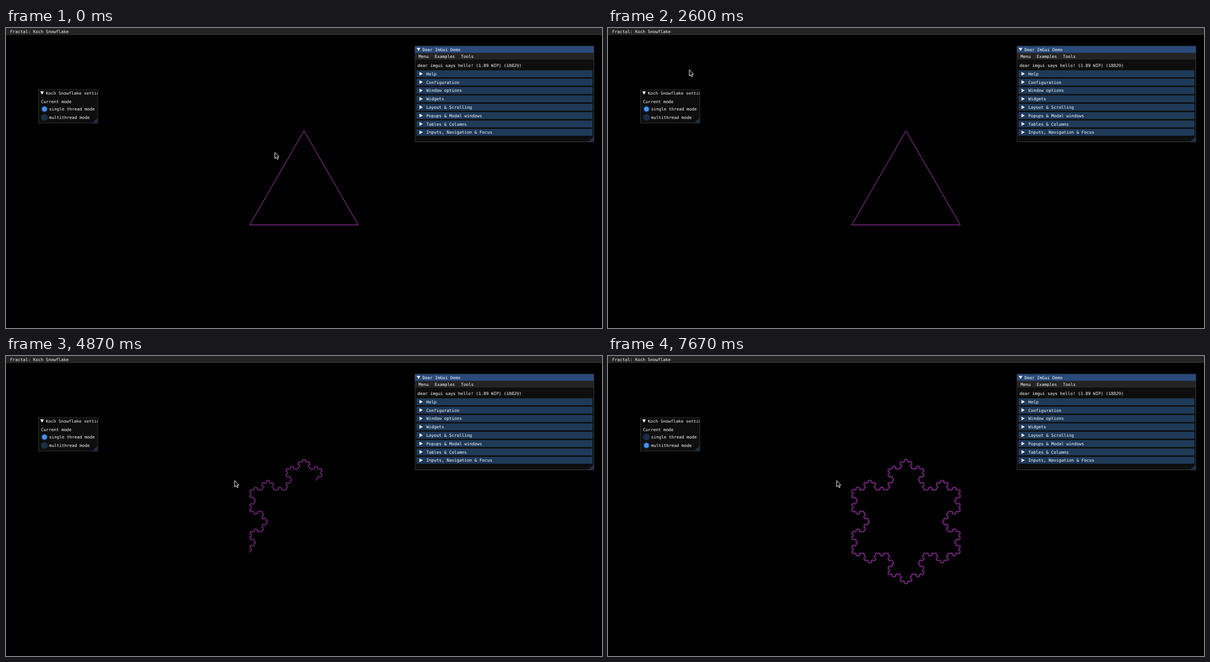
These frames come from a looping animation (1054x531 px, 8000 ms). An HTML page with a canvas:

```html
<!DOCTYPE html>
<html lang="en">
<head>
<meta charset="utf-8">
<title>Koch Snowflake</title>
<style>
  html, body { margin: 0; width: 100%; height: 100%; overflow: hidden; background: #000; }
  canvas { display: block; }
</style>
</head>
<body>
<canvas id="stage" width="1054" height="531"></canvas>
<script>
const ctx = document.getElementById('stage').getContext('2d');
const LOOP = 8000;
const TICK = 200 / 3;

const C = {
  text: '#fff', border: '#3a3a40', bar: '#242424', window: '#0e0e0e',
  title: '#0a0a0a', titleOn: '#294a7a', header: '#1f3a59', hover: '#3a7dc8',
  open: '#2d4a6c', frame: '#1b2d47', check: '#4296fa', grip: '#19304c', line: '#ae3cbc'
};
const HEADERS = ['Help', 'Configuration', 'Window options', 'Widgets', 'Layout & Scrolling',
  'Popups & Modal windows', 'Tables & Columns', 'Inputs, Navigation & Focus'];

// Drawing helpers
function box(x, y, w, h, fill) {
  ctx.fillStyle = fill;
  ctx.fillRect(x, y, w, h);
}

function outline(x, y, w, h) {
  ctx.strokeStyle = C.border;
  ctx.lineWidth = 1;
  ctx.strokeRect(x + 0.5, y + 0.5, w - 1, h - 1);
}

function poly(points, fill) {
  ctx.beginPath();
  points.forEach(([x, y]) => ctx.lineTo(x, y));
  ctx.closePath();
  ctx.fillStyle = fill;
  ctx.fill();
}

function disc(x, y, r, fill) {
  ctx.beginPath();
  ctx.arc(x, y, r, 0, 2 * Math.PI);
  ctx.fillStyle = fill;
  ctx.fill();
}

// y is the middle of the capitals
function label(str, x, y) {
  ctx.font = '7.46px "DejaVu Sans Mono", monospace';
  ctx.fillStyle = C.text;
  ctx.fillText(str, x, y + 2.8);
}

const arrowDown = (x, y) => poly([[x - 3.2, y - 2.7], [x + 3.2, y - 2.7], [x, y + 2.9]], C.text);
const arrowRight = (x, y) => poly([[x - 2.7, y - 3.2], [x + 3, y], [x - 2.7, y + 3.2]], C.text);

function panel(x, y, w, h, title, focused) {
  ctx.save();
  ctx.beginPath();
  ctx.rect(x, y, w, h);
  ctx.clip();
  box(x, y, w, h, C.window);
  box(x, y, w, 12.4, focused ? C.titleOn : C.title);
  arrowDown(x + 7, y + 6.4);
  label(title, x + 13.8, y + 6.4);
  poly([[x + w - 1, y + h - 10], [x + w - 1, y + h - 1], [x + w - 10, y + h - 1]], C.grip);
  outline(x, y, w, h);
  ctx.restore();
}

function demoWindow(focused) {
  panel(722.6, 31.5, 317.4, 170.5, 'Dear ImGui Demo', focused);
  box(723.6, 44, 315.4, 12, C.bar);
  label('Menu', 729.5, 50);
  label('Examples', 758, 50);
  label('Tools', 804.5, 50);
  label('dear imgui says hello! (1.89 WIP) (18829)', 727.8, 65.7);
  HEADERS.forEach((name, i) => {
    const y = 81 + i * 14.8;
    box(725.8, y - 6.1, 311.4, 12.2, C.header);
    arrowRight(734, y);
    label(name, 743.3, y);
  });
}

function radio(name, y, on) {
  disc(68, y, 6, C.frame);
  if (on) disc(68, y, 4.2, C.check);
  label(name, 76.2, y);
}

function settingsWindow(multi) {
  panel(56.8, 108.6, 106, 60.2, 'Koch Snowflake settings', false);
  label('Current mode', 62, 130.5);
  radio('single thread mode', 143.5, !multi);
  radio('multithread mode', 158.2, multi);
}

function menuBar(isOpen, mouse) {
  box(0, 0, 1054, 12, C.bar);
  box(0, 11, 1054, 1, C.border);
  const hovered = mouse.y < 12 && mouse.x < 116;
  if (hovered || isOpen) box(2.5, 0.5, 113.5, 11.2, hovered ? C.hover : C.open);
  label('Fractal: Koch Snowflake', 7.6, 6.2);
  if (!isOpen) return;
  box(2, 12, 102, 41, '#131313');
  outline(2, 12, 102, 41);
  if (mouse.y > 15) box(4, 16, 97, 11, C.hover);
  ['Koch Snowflake', 'Koch Surface', '3D Koch Snowflake'].forEach((s, i) => label(s, 7, 21.8 + i * 11));
}

function cursor({ x, y }) {
  const shape = [[0, 0], [0, 11], [2.5, 8.8], [4.3, 12.6], [6, 11.8], [4.3, 8.1], [7.4, 8]];
  ctx.lineJoin = 'miter';
  poly(shape.map(([dx, dy]) => [x + dx, y + dy]), '#000');
  ctx.strokeStyle = '#eee';
  ctx.lineWidth = 1;
  ctx.stroke();
}

// Koch curve
const CORNERS = [[431, 348.6], [527, 182], [623, 348.6]];
const curves = [[...CORNERS, CORNERS[0]]];

function refine(points) {
  const out = [points[0]];
  for (let i = 1; i < points.length; i++) {
    const [ax, ay] = points[i - 1], [bx, by] = points[i];
    const dx = (bx - ax) / 3, dy = (by - ay) / 3, k = Math.sqrt(3) / 2;
    out.push([ax + dx, ay + dy],
      [ax + 1.5 * dx + k * dy, ay + 1.5 * dy - k * dx],
      [bx - dx, by - dy], [bx, by]);
  }
  return out;
}
for (let d = 1; d <= 6; d++) curves.push(refine(curves[d - 1]));

function snowflake(depth, count) {
  const points = curves[depth];
  const last = Math.min(points.length - 1, Math.floor(count));
  ctx.beginPath();
  for (let i = 0; i <= last; i++) ctx.lineTo(points[i][0], points[i][1]);
  ctx.lineJoin = 'bevel';
  ctx.lineWidth = 1;
  ctx.strokeStyle = C.line;
  ctx.stroke();
}

// Timeline
const SPEED = 0.574; // segments per ms in single thread mode
const STAGES = [
  { at: 0, depth: 0 },
  { at: 3200, depth: 1, from: 3190 },
  { at: 3530, depth: 2, from: 3506 },
  { at: 3930, depth: 3, from: 3910 },
  { at: 4330, depth: 4, from: 4338 },
  { at: 6130, depth: 4 },
  { at: 6800, depth: 5 },
  { at: 7200, depth: 6 }
];
const MOVES = [
  { from: 600, to: 1200, x: 85.5, y: 7.5 },
  { from: 1667, to: 1867, x: 51.5, y: 22 },
  { from: 2533, to: 2733, x: 404.5, y: 220.5 }
];

function mouseAt(t) {
  let x = 475.5, y = 220;
  for (const m of MOVES) {
    const u = Math.max(0, Math.min(1, (t - m.from) / (m.to - m.from)));
    const e = u * u * (3 - 2 * u);
    x += (m.x - x) * e;
    y += (m.y - y) * e;
  }
  return { x, y };
}

function draw(time) {
  // The screen refreshes fifteen times a second
  const t = Math.floor((time + 4) / TICK) * TICK + 4;
  const mouse = mouseAt(t - 4);
  const stage = STAGES.filter(s => s.at <= t).pop();
  const count = stage.from ? Math.max(0, (t - stage.from) * SPEED) : Infinity;
  const menuOpen = t >= 1330 && t < 2330;

  box(0, 0, 1054, 531, '#000');
  snowflake(stage.depth, count);
  settingsWindow(t >= 6130);
  demoWindow(!menuOpen);
  menuBar(menuOpen, mouse);
  cursor(mouse);
}

function loop() {
  draw(performance.now() % LOOP);
  requestAnimationFrame(loop);
}
loop();
</script>
</body>
</html>
```
